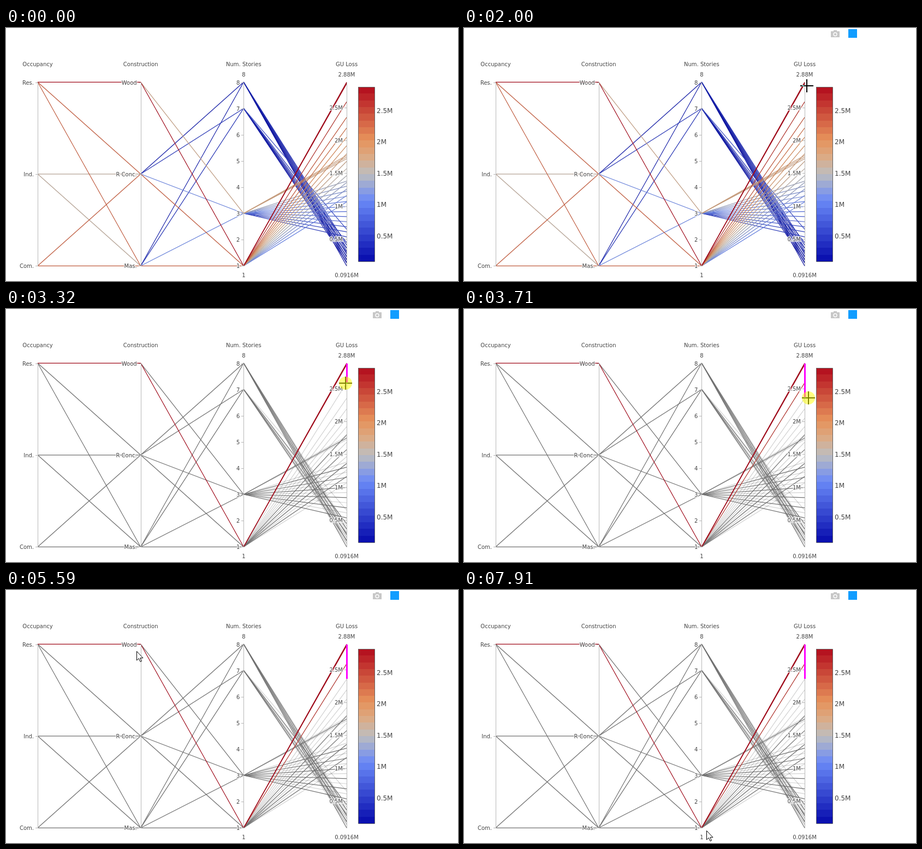
An HTML page with a canvas for the animation above (7990 ms loop, 828 by 464 pixels).

```html
<!DOCTYPE html>
<html lang="en">
<head>
<meta charset="utf-8">
<title>Parallel coordinates</title>
<style>
  html, body { margin: 0; width: 100%; height: 100%; overflow: hidden; background: #fff; }
  canvas { display: block; }
</style>
</head>
<body>
<canvas id="stage" width="828" height="464"></canvas>
<script>
const ctx = document.getElementById('stage').getContext('2d');
const LOOP = 7990, TICK = 75;
const TOP = 100, HEIGHT = 336, MIN = 0.0916, MAX = 2.88;

const range = (n, make) => Array.from({ length: n }, (_, i) => make(i));
const axisX = i => 58 + i * 566 / 3;
const categoryY = i => TOP + i * HEIGHT / 2;
const storyY = n => TOP + (8 - n) * HEIGHT / 7;
const lossY = loss => TOP + (MAX - loss) / (MAX - MIN) * HEIGHT;
const yLoss = y => MAX - (y - TOP) / HEIGHT * (MAX - MIN);

const SCALE = [
  [0, 5, 10, 172], [0.35, 106, 137, 247], [0.5, 190, 190, 190],
  [0.6, 220, 170, 132], [0.7, 230, 145, 90], [1, 178, 10, 28]
];
function lossColor(loss, brightness = 1) {
  const t = Math.min(1, Math.max(0, (loss - MIN) / (MAX - MIN)));
  const i = Math.max(1, SCALE.findIndex(s => s[0] >= t));
  const a = SCALE[i - 1], b = SCALE[i], p = (t - a[0]) / (b[0] - a[0]);
  return `rgb(${[1, 2, 3].map(k => Math.round((a[k] + (b[k] - a[k]) * p) * brightness))})`;
}

// Categories 0-2 run from top to bottom; category 0 of the second axis is wood.
const links = [];
const occupancyLoss = [2.3, 1.6, 2.3];
const storyLoss = { 1: 2.3, 3: 1.1, 7: 0.5, 8: 0.3 };
for (let kind = 0; kind < 3; kind++) {
  const y = categoryY(kind), extra = kind === 0 ? 0.6 : 0;
  occupancyLoss.forEach((loss, i) => {
    if (kind > 0 || i === 0) links.push({ axis: 0, y0: categoryY(i), y1: y, loss: loss + extra });
  });
  for (const n of [1, 3, 7, 8]) {
    if (kind > 0 || n <= 3) links.push({ axis: 1, y0: y, y1: storyY(n), loss: storyLoss[n] + extra });
  }
}

function addFan(stories, count, from, to, power = 1) {
  for (let i = 0; i < count; i++) {
    const y = from + (to - from) * (i / (count - 1)) ** power;
    links.push({ axis: 2, y0: storyY(stories), y1: y, loss: yLoss(y), rare: i % 2 === 0 || y < 220 });
  }
}
addFan(1, 3, 100, 103);
addFan(1, 13, 136, 319, 0.75);
addFan(3, 3, 234, 240);
addFan(3, 12, 281, 383);
addFan(7, 7, 369, 429, 0.5);
addFan(8, 8, 398, 436);
links.sort((a, b) => a.axis - b.axis || a.loss - b.loss);

// Pointer moves: first tick, last tick, destination.
const moves = [
  [70, 830, 615, 103], [1000, 1080, 611, 98], [1230, 1370, 628, 108],
  [1850, 2150, 628, 104], [2470, 2710, 625, 100],
  [3090, 3320, 622, 136], [3400, 3710, 631, 163],
  [4960, 5750, 108, 95], [5830, 5900, 43, 105], [6380, 6900, 255, 106], [7380, 7910, 444, 441]
];
function pointerAt(time) {
  let x = 778, y = 510;
  for (const [start, end, toX, toY] of moves) {
    if (time < start) break;
    const gaps = Math.round((end - start) / TICK);
    const gap = Math.min(gaps, Math.floor((time - start) / (end - start) * gaps + 1e-6));
    const p = (gap + 1) / (gaps + 1);
    x += (toX - x) * p;
    y += (toY - y) * p;
  }
  return { x: Math.round(x), y: Math.round(y) };
}

function rect(color, x, y, w, h) {
  ctx.fillStyle = color;
  ctx.fillRect(x, y, w, h);
}

function disc(color, x, y, r) {
  ctx.fillStyle = color;
  ctx.beginPath();
  ctx.arc(x, y, r, 0, 7);
  ctx.fill();
}

function label(text, x, y, align = 'center', size = 10) {
  ctx.font = `${size}px "DejaVu Sans", Verdana, sans-serif`;
  ctx.textAlign = align;
  ctx.lineWidth = 3;
  ctx.lineJoin = 'round';
  ctx.strokeStyle = 'rgba(255,255,255,0.8)';
  ctx.strokeText(text, x, y);
  ctx.fillStyle = '#444';
  ctx.fillText(text, x, y);
}

// The line layer is one pixel taller than the axes.
const linkY = y => y - 0.7 + (y - TOP) / HEIGHT;

function drawLink({ axis, y0, y1 }, color) {
  ctx.strokeStyle = color;
  ctx.lineWidth = 1.2;
  ctx.beginPath();
  ctx.moveTo(axisX(axis), linkY(y0));
  ctx.lineTo(axisX(axis + 1), linkY(y1));
  ctx.stroke();
}

function drawLinks(brushY) {
  const selected = ({ axis, loss, y1 }) =>
    brushY === null || (axis < 2 ? loss > MAX : y1 < Math.max(brushY, 104));
  const muted = links.filter(link => !selected(link));
  muted.filter(link => link.rare).forEach(link => drawLink(link, 'rgba(0,0,0,0.18)'));
  muted.filter(link => !link.rare).forEach(link => drawLink(link, '#707070'));
  links.filter(selected).forEach(link => drawLink(link, lossColor(link.loss, 0.89)));
}

function drawAxis(i, title, ticks, limits = []) {
  const x = axisX(i), left = Math.ceil(x - 0.5);
  rect('#b8b8b8', left, TOP, 1, HEIGHT + 1);
  for (const [text, y] of ticks) {
    rect('#b8b8b8', left - 4, Math.round(y), 4, 1);
    label(text, x - 7, Math.round(y) + 3.5, 'right');
  }
  label(title, x, 70);
  limits.forEach((text, k) => label(text, x, k ? 88.5 : 456.5));
}

const lossTicks = range(5, i => (i + 1) / 2);
const categories = names => names.map((name, i) => [name, categoryY(i)]);

function drawAxes() {
  drawAxis(0, 'Occupancy', categories(['Res.', 'Ind.', 'Com.']));
  drawAxis(1, 'Construction', categories(['Wood', 'R Conc.', 'Mas.']));
  drawAxis(2, 'Num. Stories', range(8, i => [i + 1, storyY(i + 1)]), ['1', '8']);
  drawAxis(3, 'GU Loss', lossTicks.map(m => [m + 'M', lossY(m)]), ['0.0916M', '2.88M']);
}

function drawColorBar() {
  const bands = 26, edge = i => Math.round(108 + i * 320 / bands);
  for (let i = 0; i < bands; i++) {
    const loss = MAX - (i + 0.5) / bands * (MAX - MIN);
    rect(lossColor(loss), 645, edge(i), 30, edge(i + 1) - edge(i));
  }
  ctx.strokeStyle = '#666';
  ctx.lineWidth = 1;
  ctx.strokeRect(645.5, 108.5, 30, 320);
  for (const m of lossTicks) {
    label(m + 'M', 679, 112.5 + (MAX - m) / (MAX - MIN) * 320, 'left', 12);
  }
}

function drawToolbar(alpha) {
  ctx.globalAlpha = alpha;
  rect('#c7c7c7', 672, 6, 16, 11);
  rect('#c7c7c7', 677, 4, 6, 2);
  disc('#fff', 680, 11.5, 3.7);
  disc('#c7c7c7', 680, 11.5, 2.3);
  rect('#119dff', 704, 2, 16, 16);
  ctx.globalAlpha = 1;
}

const arrow = new Path2D('M0 0V16.5L3.8 13L6.5 19L9 18L6.4 12.2H11.5Z');

function drawArrow(x, y) {
  ctx.save();
  ctx.translate(x + 0.5, y + 0.5);
  ctx.fillStyle = '#fff';
  ctx.fill(arrow);
  ctx.strokeStyle = '#000';
  ctx.lineWidth = 1;
  ctx.lineJoin = 'miter';
  ctx.stroke(arrow);
  ctx.restore();
}

// The crosshair inverts what lies below it.
function drawCross(x, y) {
  ctx.globalCompositeOperation = 'difference';
  rect('#fff', x - 12, y - 1, 24, 2);
  rect('#fff', x - 1, y - 12, 2, 11);
  rect('#fff', x - 1, y + 1, 2, 11);
  ctx.globalCompositeOperation = 'source-over';
}

function draw() {
  const time = performance.now() % LOOP;
  const { x, y } = pointerAt(time);
  const brushY = time < 3090 ? null : time < 3710 ? y : 163;
  const overAxis = time >= 1230 && time < 4810;
  const pressed = time >= 2950 && time < 4730;

  rect('#fff', 0, 0, 828, 464);
  drawLinks(brushY);
  drawAxes();
  if (brushY !== null) rect('#f0f', 623, TOP, 3, brushY - TOP);
  drawColorBar();
  drawToolbar(Math.min(1, Math.max(0, (time - 70) / 300)));
  (overAxis ? drawCross : drawArrow)(x, y);
  if (pressed) disc('rgba(255,255,0,0.5)', x, y, 12);
  requestAnimationFrame(draw);
}
draw();
</script>
</body>
</html>
```
